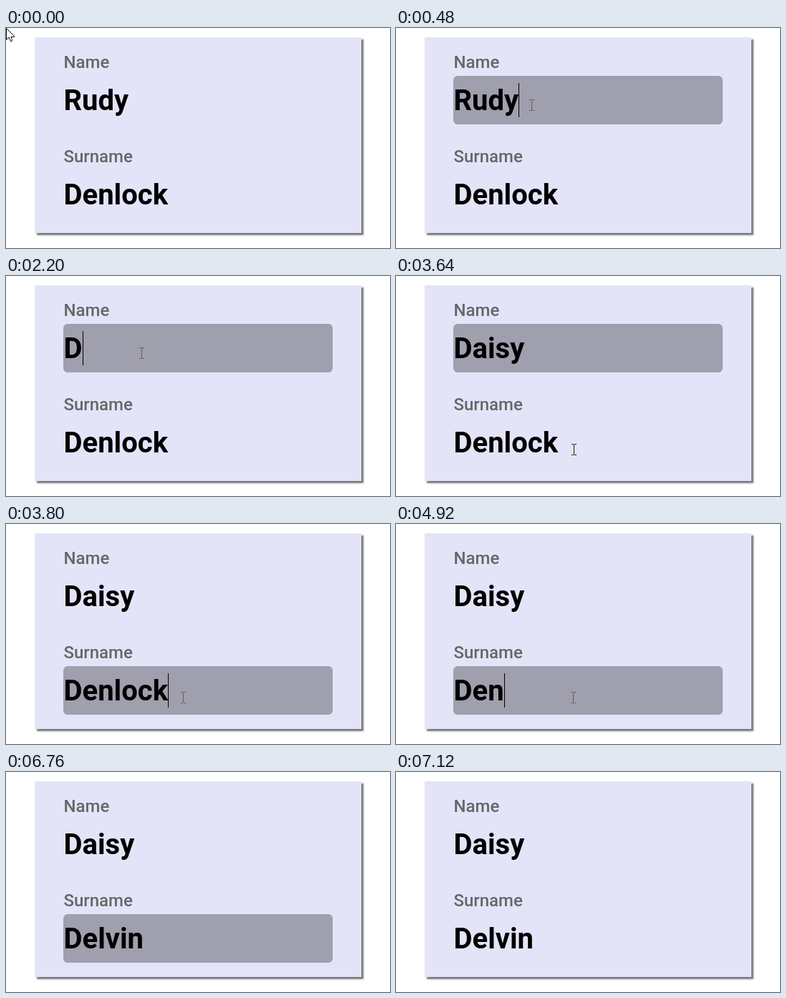
An HTML page for the animation above (8.84 s loop, 536 by 308 pixels).

```html
<!DOCTYPE html>
<html lang="en">
<head>
<meta charset="utf-8">
<title>Name form</title>
<style>
  html, body { margin: 0; width: 100%; height: 100%; overflow: hidden; background: #fff; }
  .card {
    position: absolute; left: 40px; top: 13px; width: 456px; height: 274px;
    background: #e4e4f9; box-shadow: 3px 3px 2px #777;
  }
  svg { position: absolute; left: 0; top: 0; width: 536px; height: 308px; }
  text { font-family: Roboto, sans-serif; }
  .label { font-size: 24px; font-weight: 500; fill: #666; }
  .value { font-size: 40px; font-weight: 700; fill: #000; }
  .field { fill: rgba(0, 0, 0, .3); opacity: 0; }
  #beam { fill: none; stroke: #fff; mix-blend-mode: difference; }
  #arrow { fill: #fff; stroke: #000; }
</style>
</head>
<body>
<div class="card"></div>
<svg viewBox="0 0 536 308">
  <rect class="field" x="80" y="67" width="376" height="68" rx="6"/>
  <rect class="field" x="80" y="199" width="376" height="68" rx="6"/>
  <text class="label" x="80.5" y="56">Name</text>
  <text class="value" x="80.5" y="115">Rudy</text>
  <text class="label" x="80.5" y="188">Surname</text>
  <text class="value" x="80.5" y="247">Denlock</text>
  <rect id="caret" width="1" height="48"/>
  <path id="beam" d="M-3.5-7.5h3m1 0h3M0-7V7M-3.5 7.5h3m1 0h3"/>
  <path id="arrow" d="M.5.5V16.5L4 13L6.5 18.5H8L8.5 16.5L7 12.5H11.5V11.5Z"/>
</svg>
<script>
  const LOOP = 8840, TICK = 40;
  const fields = document.querySelectorAll('.field');
  const values = document.querySelectorAll('.value');
  const [caret, beam, arrow] = ['caret', 'beam', 'arrow'].map(id => document.getElementById(id));

  // Each field: text before and after, key times, focus and blur times
  const edits = [
    { from: 'Rudy', to: 'Daisy', focus: 400, blur: 3680,
      del: [1080, 1240, 1360, 1520], add: [2200, 2320, 2520, 2680, 2840] },
    { from: 'Denlock', to: 'Delvin', focus: 3680, blur: 7040,
      del: [4480, 4600, 4760, 4920, 5120], add: [5760, 5840, 5920, 6040] }
  ];
  const caretOn = [[480, 960], [1080, 2000], [2200, 3320], [3760, 4240], [4480, 5320], [5760, 6520]];
  // time, x, y
  const path = [
    [0, 0, 0], [440, 189, 108], [3280, 189, 108], [3600, 248, 243],
    [3680, 248, 243], [3720, 247, 243], [6640, 247, 243], [6680, 251, 270], [6760, 251, 270]
  ];

  const passed = (times, t) => times.filter(k => k <= t).length;
  const ramp = (t, start, length) => Math.min(1, Math.max(0, (t - start) / length));
  const show = (el, on) => el.setAttribute('visibility', on ? 'visible' : 'hidden');

  function textAt({ from, to, del, add }, t) {
    const left = from.length - passed(del, t);
    const typed = passed(add, t);
    return typed ? to.slice(0, left + typed) : from.slice(0, left);
  }

  function pointerAt(t) {
    const i = path.findIndex(p => p[0] > t);
    if (i < 0) return null;
    const [t0, x0, y0] = path[i - 1], [t1, x1, y1] = path[i];
    const u = ramp(t, t0, t1 - t0), e = u * u * (3 - 2 * u);
    return [x0 + (x1 - x0) * e, y0 + (y1 - y0) * e];
  }

  function drawPointer(t) {
    const p = pointerAt(t);
    const overField = p && (p[1] > 199 || (p[1] > 67 && p[1] < 135));
    show(beam, p && overField);
    show(arrow, p && !overField);
    if (!p) return;
    const [x, y] = p.map(Math.round);
    beam.setAttribute('transform', `translate(${x + .5} ${y})`);
    arrow.setAttribute('transform', `translate(${x} ${y})`);
  }

  function draw(t) {
    edits.forEach((edit, i) => {
      const text = textAt(edit, t);
      if (values[i].textContent !== text) values[i].textContent = text;
      fields[i].style.opacity = ramp(t, edit.focus, 80) - ramp(t, edit.blur, 80);
    });
    const active = t < 3720 ? 0 : 1;
    caret.setAttribute('x', Math.round(80.5 + values[active].getComputedTextLength()));
    caret.setAttribute('y', active ? 209 : 77);
    show(caret, caretOn.some(([a, b]) => t >= a && t < b));
    drawPointer(t);
  }

  const start = performance.now();
  function tick() {
    const t = (performance.now() - start) % LOOP;
    draw(Math.floor(t / TICK) * TICK);
    requestAnimationFrame(tick);
  }
  tick();
</script>
</body>
</html>
```
